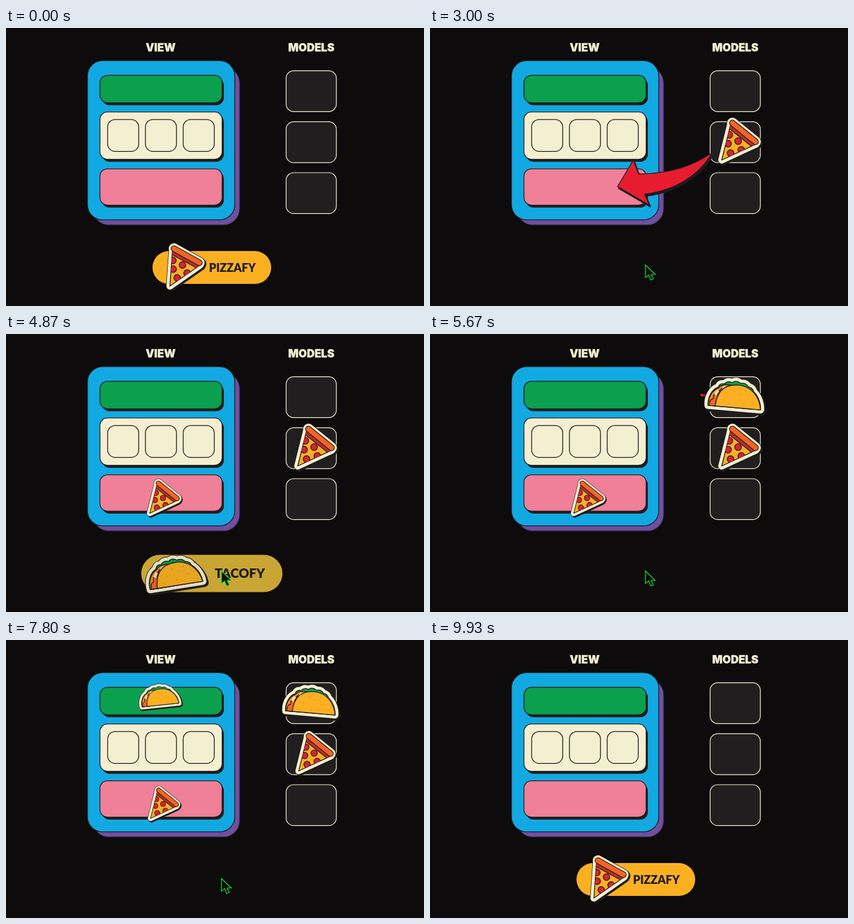
Animation, 662 px wide and 440 px high, one loop 9990 ms. Source, as an HTML page:

```html
<!DOCTYPE html>
<html lang="en">
<head>
<meta charset="utf-8">
<title>View and models</title>
<style>
  html, body { margin: 0; width: 100%; height: 100%; overflow: hidden; background: #0d0b0c; }
  svg { display: block; width: 662px; height: 440px; }
  .title { font: 900 17px Inter, sans-serif; fill: #f5efd2; stroke: #f5efd2; stroke-width: .3; text-anchor: middle; }
  .label { font: 900 18px Lato, sans-serif; fill: #1f1c1d; }
  .ink { stroke: #1f1c1d; stroke-width: 1.3; stroke-linejoin: round; }
  .slot { fill: #201e1f; stroke: #f5efd2; stroke-width: 1.2; }
  .edge { fill: none; stroke-linejoin: round; stroke-linecap: round; }
</style>
</head>
<body>
<svg viewBox="0 0 662 440">
  <defs>
    <path id="slice" d="M-13-26L27 5L-27 30Z"/>
    <path id="crust" d="M-10-28.5L26.500 1"/>
    <clipPath id="sliceClip"><use href="#slice"/></clipPath>
    <g id="pizza">
      <g class="edge" stroke="#1f1c1d">
        <g transform="translate(2 2.5)">
          <use href="#slice" stroke-width="12"/>
          <use href="#crust" stroke-width="18"/>
        </g>
        <use href="#slice" stroke-width="12.5"/>
        <use href="#crust" stroke-width="18.5"/>
      </g>
      <g class="edge" stroke="#f5efd2">
        <use href="#slice" stroke-width="11"/>
        <use href="#crust" stroke-width="17"/>
      </g>
      <use href="#slice" fill="#fbb022" class="ink"/>
      <g clip-path="url(#sliceClip)">
        <g id="pepperoni" fill="#dc2033" class="ink"></g>
        <path d="M-17-25L27 10" stroke="#1f1c1d" stroke-width="7"/>
        <path d="M-17-25L27 10" stroke="#c02b2b" stroke-width="4.5"/>
      </g>
      <use href="#crust" class="edge" stroke="#1f1c1d" stroke-width="10.5"/>
      <use href="#crust" class="edge" stroke="#f26522" stroke-width="8"/>
    </g>

    <path id="dome" d="M-40 18C-42 6-36-8-27-11Q-25-18-18-17Q-13-23-6-20Q0-25 7-20Q15-22 19-16Q26-15 28-9C37-2 41 10 41 18Z"/>
    <g id="taco">
      <use href="#dome" class="edge" stroke="#1f1c1d" stroke-width="13" transform="translate(2 2.5)"/>
      <use href="#dome" class="edge" stroke="#1f1c1d" stroke-width="13"/>
      <use href="#dome" class="edge" stroke="#f5efd2" stroke-width="11"/>
      <use href="#dome" fill="#0ba04d" class="ink"/>
      <path class="ink" fill="#f7931e" d="M-40 18C-41 4-34-7-26-10Q-22-17-8-16L-20 18Z"/>
      <path class="ink" fill="#f26522" d="M-38 18Q-39 8-33 7Q-34-1-27-2L-22 18Z"/>
      <path class="ink" fill="#dc2033" d="M-27-3l6-7 6 2-6 9z"/>
      <path fill="#f5efd2" d="M-32 0l4-7 3 2-4 7zM-22-7l4-7 3 2-4 7z"/>
      <path class="ink" fill="#fbb022" d="M-29 18C-28-12-10-17 4-17C24-17 38-2 41 18Z"/>
      <g id="specks" fill="#8a5a14"></g>
    </g>

    <path id="arrowShape" d="M444 199C412 221 372 231 330 231L322 209L297 251L347 280L340 263C388 257 424 234 444 202Z"/>
    <g id="arrow" stroke-linejoin="round">
      <use href="#arrowShape" fill="#1f1c1d" stroke="#1f1c1d" stroke-width="2" transform="translate(2 3)"/>
      <use href="#arrowShape" fill="#e81c30" class="ink"/>
    </g>
  </defs>

  <text class="title" x="245" y="37">VIEW</text>
  <text class="title" x="483.5" y="37">MODELS</text>
  <g id="layout"></g>

  <g id="pizzaButton">
    <rect x="-94" y="-26" width="188" height="52" rx="26"/>
    <text class="label" x="-4.5" y="6.5">PIZZAFY</text>
  </g>
  <g id="tacoButton">
    <rect x="-99" y="-26" width="198" height="52" rx="26"/>
    <text class="label" x="4" y="6.5">TACOFY</text>
  </g>

  <use id="pizzaView" href="#pizza"/>
  <use id="tacoView" href="#taco"/>
  <use id="pizzaArrow" href="#arrow"/>
  <use id="tacoArrow" href="#arrow"/>
  <use id="pizzaModel" href="#pizza"/>
  <use id="tacoModel" href="#taco"/>
  <path id="cursor" d="M0 0V20L5 16L8.5 24L12.5 22L9 15H15.5Z" fill="#0d0b0c" stroke="#14e62c" stroke-width="1.2"/>
</svg>

<script>
const LOOP = 9990, CENTER = [326, 379];
const $ = id => document.getElementById(id);
const mix = (a, b, k) => a + (b - a) * k;

// Eased value from a flat list of time, value pairs
function track(t, ...keys) {
  if (t <= keys[0]) return keys[1];
  for (let i = 2; i < keys.length; i += 2) {
    if (t < keys[i]) {
      const k = (t - keys[i - 2]) / (keys[i] - keys[i - 2]);
      return mix(keys[i - 1], keys[i + 1], k * k * (3 - 2 * k));
    }
  }
  return keys[keys.length - 1];
}

function pose(el, scale, transform) {
  el.setAttribute("visibility", scale > .001 ? "visible" : "hidden");
  el.setAttribute("transform", transform);
}

function place(el, x, y, scale, turn = 0) {
  pose(el, scale, `translate(${x} ${y}) rotate(${turn}) scale(${scale})`);
}

function box(x, y, w, h, r, attrs) {
  return `<rect x="${x}" y="${y}" width="${w}" height="${h}" rx="${r}" ${attrs}/>`;
}

function panel(y, h, fill) {
  return box(152, y + 4, 193, h, 12, 'fill="#1f1c1d"') +
    box(148.8, y, 193.5, h, 12, `fill="${fill}" class="ink"`);
}

$("layout").innerHTML =
  box(137, 61, 233.3, 251, 26, 'fill="#6f4f9f" class="ink"') +
  box(129, 51.7, 233.3, 252, 24, 'fill="#12a9e2" class="ink"') +
  panel(74.8, 43.5, "#0ba04d") + panel(132.8, 75, "#f5efd2") + panel(222.8, 57.5, "#f07f98") +
  [161, 220.8, 280.6].map(x => box(x, 144.8, 49.2, 50.6, 12, 'fill="none" class="ink"')).join("") +
  [67.6, 148.4, 229].map(y => box(443.6, y, 79.6, 64.7, 12, 'class="slot"')).join("");

const dots = (list, r) => list.map(([x, y]) => `<circle cx="${x}" cy="${y}" r="${r}"/>`).join("");
$("pepperoni").innerHTML = dots([[-15, -10], [-1, 0], [-17, 4], [4, 14], [-13, 19]], 5.3);
$("specks").innerHTML = dots([[-12, 2], [-3, -8], [6, -3], [15, -9], [20, 3], [-18, 12], [2, 10], [28, 11], [13, 13]], .5);

// Poses are x, y, scale and turn; arrow times are start, full, leave and gone
const foods = [
  {
    name: "pizza", hover: 1160, click: 1720, fly: [1850, 2350], arrow: [2500, 2950, 3120, 3420],
    show: t => track(t, 7750, 1, 8100, 0, 8250, 0, 8550, 1.06, 8800, 1),
    resets: true,
    icon: [280.5, 375, .98, -10], model: [489, 179, 1, 0], view: [249.5, 259.5, .81, 0],
    arrowTurn: 0, arrowShift: [0, 0]
  },
  {
    name: "taco", hover: 4720, click: 4940, fly: [5050, 5500], arrow: [5600, 5980, 6120, 6400],
    show: t => track(t, 3880, 0, 4150, 1.06, 4330, 1, 7750, 1, 8100, 0),
    icon: [273.5, 379.5, .92, -9], model: [483, 98, 1.03, 5], view: [243, 90, .77, -6],
    arrowTurn: 19, arrowShift: [-2, -104]
  }
];

function drawFood(f, t) {
  const [cx, cy] = CENTER;
  const fresh = f.resets && t > 8150;
  const show = f.show(t);
  const hovered = fresh ? 0 : track(t, f.hover, 0, f.hover + 140, 1);
  const press = track(t, f.click - 60, 1, f.click, .94, f.click + 80, 1);
  const flown = fresh ? 0 : track(t, f.fly[0], 0, f.fly[1], 1);
  const size = show * mix(1, 1.13, hovered) * press;

  const button = $(f.name + "Button");
  const left = fresh ? 1 : track(t, f.fly[0], 1, f.fly[0] + 200, 0);
  place(button, cx, cy, size * left);
  const tone = [mix(251, 201, hovered), mix(176, 165, hovered), mix(34, 51, hovered)];
  button.firstElementChild.setAttribute("fill", `rgb(${tone.map(Math.round)})`);

  const [ix, iy, is, ir] = f.icon, [mx, my, ms, mr] = f.model;
  const sticker = $(f.name + "Model");
  place(sticker,
    mix(cx + (ix - cx) * size, mx, flown),
    mix(cy + (iy - cy) * size, my, flown),
    mix(is * size, ms * show, flown),
    mix(ir, mr, flown));
  sticker.style.filter = `brightness(${1 - .07 * hovered * (1 - flown)})`;

  const [start, full, leave, gone] = f.arrow;
  const [vx, vy, vs, vr] = f.view;
  const shown = track(t, leave - 60, 0, leave + 160, 1.1, leave + 280, 1, 7750, 1, 8100, 0);
  place($(f.name + "View"), vx, vy, vs * shown, vr);

  // The arrow grows out of its tail and shrinks into its head
  const growing = t < leave;
  const scale = growing ? track(t, start, 0, full, 1) : track(t, leave, 1, gone, 0);
  const [px, py] = growing ? [444, 200] : [297, 251];
  pose($(f.name + "Arrow"), scale,
    `translate(${f.arrowShift}) rotate(${f.arrowTurn} 444 200) ` +
    `translate(${px} ${py}) scale(${scale}) translate(${-px} ${-py})`);
}

function drawCursor(t) {
  const x = track(t, 800, 425, 1250, 341.2);
  const y = track(t, 800, 392, 1250, 375, 7750, 375, 8200, 445);
  place($("cursor"), x, y, t < 8250 ? 1 : 0);
  $("cursor").setAttribute("opacity", track(t, 800, 0, 920, 1));
}

const begin = performance.now();
function frame() {
  const t = (performance.now() - begin) % LOOP;
  foods.forEach(f => drawFood(f, t));
  drawCursor(t);
  requestAnimationFrame(frame);
}
frame();
</script>
</body>
</html>
```
